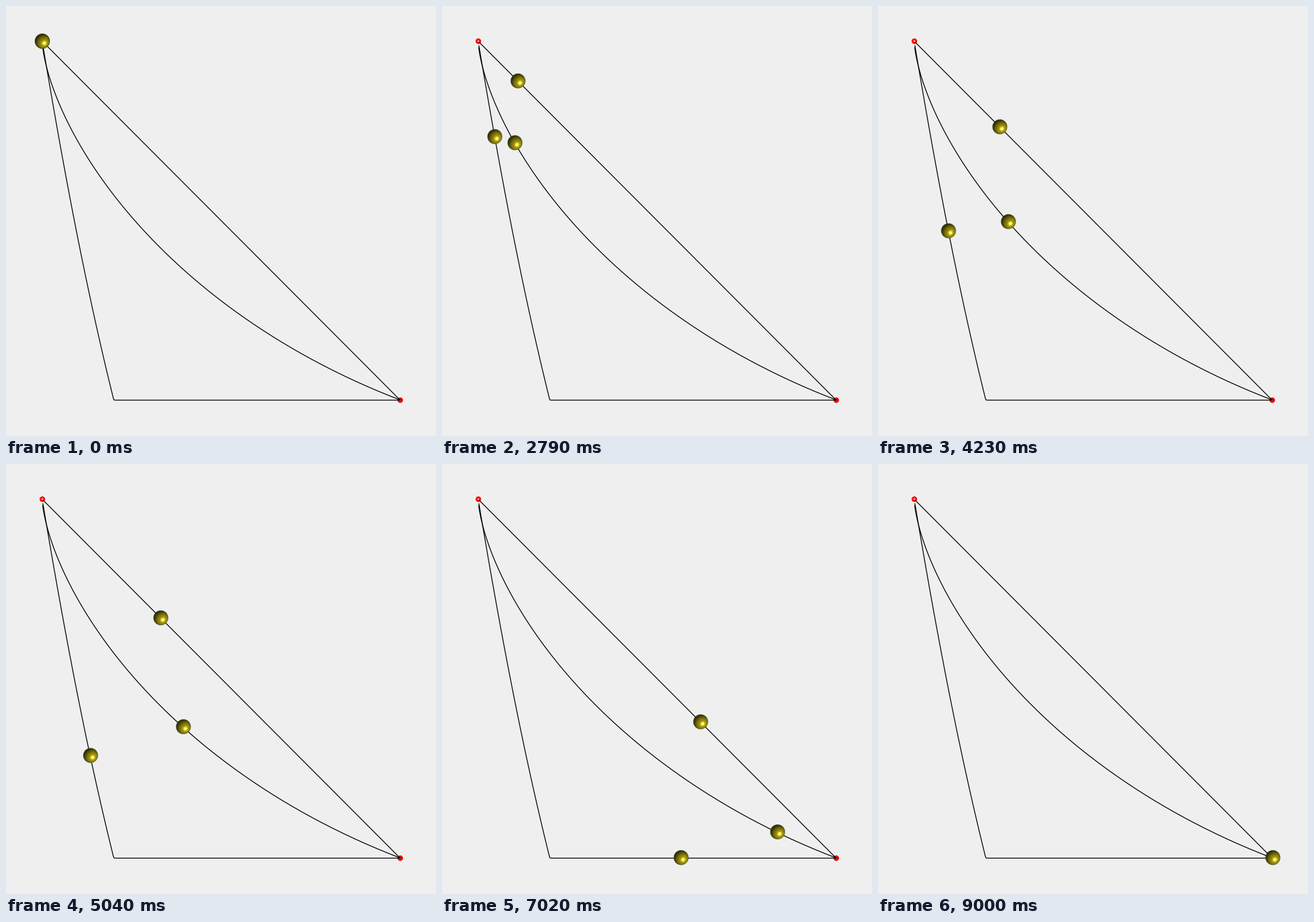
These frames come from a looping animation (704x703 px, 9090 ms). A matplotlib script:

```python
import matplotlib.pyplot as plt
import numpy as np
from matplotlib.animation import FuncAnimation
from matplotlib.patches import Circle

W, H, DPI = 704, 703, 64
FRAMES, INTERVAL = 101, 90
X0, Y0 = 59.2, 57.5          # start point
X1, Y1 = 645.9, 644.4        # end point
SPAN = Y1 - Y0
R_BALL = 11.8
ROLL = 336.2                 # rolling radius of the cycloid
THETA_END = 2.412


def px(width):
    return width * 72 / DPI


def cycloid(theta):
    return X0 + ROLL * (theta - np.sin(theta)), Y0 + ROLL * (1 - np.cos(theta))


def steep(drop):
    """Point on the steep branch at a given depth below the start."""
    return X0 + drop * (0.168 + 2.5e-5 * drop + 5e-8 * drop**2), Y0 + drop


def line_ball(n):
    d = min(0.415 * n + 0.05455 * n * n, SPAN)
    return X0 + d, Y0 + d


def cycloid_ball(n):
    if n == 0:
        return X0, Y0
    theta = 0.2515 + 0.0255 * n
    return cycloid(theta) if theta < THETA_END else None


def corner_ball(n):
    if n <= 64:
        return steep(2.03 * n + 0.0975 * n * n + 0.22 * max(0, n - 55) ** 2)
    x = 167 + 16 * (n - 64)
    return (x, Y1) if x < X1 else None


def sphere(size=120):
    """Shaded ball as an RGBA image, lit from the lower right."""
    axis = np.linspace(-1.02, 1.02, size)
    x, y = np.meshgrid(axis, axis)
    r = np.hypot(x, y)
    z = np.sqrt(np.clip(1 - r**2, 0, 1))
    diffuse = np.clip(0.36 * x + 0.34 * y + 0.87 * z, 0, 1)
    shine = np.clip(0.27 * x + 0.27 * y + 0.925 * z, 0, 1) ** 38
    base = np.array([0.70, 0.64, 0.06])
    rgb = base * (0.22 + 0.78 * diffuse[..., None] ** 1.3)
    rim = 0.55 * np.clip(r, 0, 1)[..., None] ** 10
    rgb = rgb * (1 - rim) + np.array([0.27, 0.36, 0.20]) * rim
    rgb = rgb + shine[..., None] * np.array([0.62, 0.62, 0.55])
    return np.dstack([np.clip(rgb, 0, 1), r <= 1])


fig = plt.figure(figsize=(W / DPI, H / DPI), dpi=DPI, facecolor="#efefef")
ax = fig.add_axes([0, 0, 1, 1])
ax.axis("off")

for x, y in ((X0 + 0.3, Y0), (X1 - 0.4, Y1)):
    ax.add_patch(Circle((x, y), 2.9, fill=False, ec="#ff0000", lw=px(3.2), zorder=1))

drop = np.linspace(7.5, SPAN - 3, 120)
sx, sy = steep(drop)
paths = [
    ([X0 + 2, X1 - 0.5], [Y0 + 2, Y1]),
    cycloid(np.linspace(0.25, THETA_END, 200)),
    (np.append(sx, [176.6, 178, X1]), np.append(sy, [Y1 - 0.7, Y1, Y1])),
]
for xs, ys in paths:
    ax.plot(xs, ys, color="black", lw=px(1.35), zorder=2)

ball = sphere()
movers = [line_ball, corner_ball, cycloid_ball]
images = [
    ax.imshow(ball, extent=(0, 1, 1, 0), aspect="auto", interpolation="hanning", zorder=3 + i)
    for i in range(len(movers))
]
ax.set_xlim(0, W)
ax.set_ylim(H, 0)


def draw(n):
    for image, mover in zip(images, movers):
        spot = mover(n)
        image.set_visible(spot is not None)
        if spot is not None:
            x, y = spot
            r = R_BALL * 1.02
            image.set_extent((x - r, x + r, y + r, y - r))
    return images


anim = FuncAnimation(fig, draw, frames=FRAMES, interval=INTERVAL,
                     repeat=True, repeat_delay=0, blit=False)
plt.show()
```
